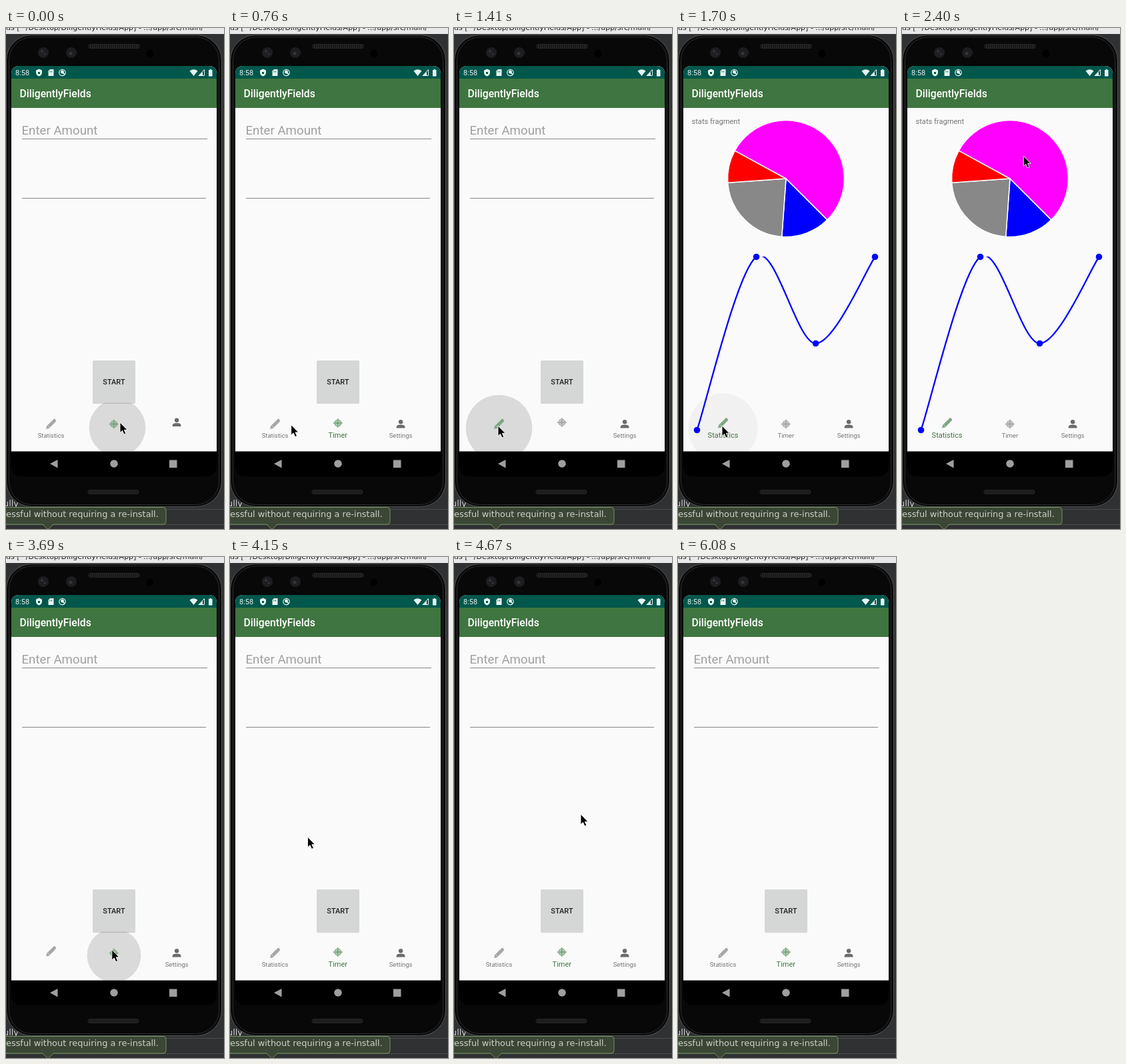
These frames come from a looping animation (327x752 px, 6670 ms). An HTML page:

```html
<!DOCTYPE html>
<html lang="en">
<head>
<meta charset="utf-8">
<title>Timer app</title>
<style>
  html, body { margin: 0; width: 100%; height: 100%; overflow: hidden; background: #2f3133; }
  svg { display: block; width: 327px; height: 752px; font-family: Roboto, sans-serif; }
  .desk { font-family: "DejaVu Sans", sans-serif; font-size: 12.9px; fill: #cfd1cc; }
  .medium { font-weight: 500; }
  .item text { text-anchor: middle; }
</style>
</head>
<body>
<svg viewBox="0 0 327 752">
  <defs>
    <clipPath id="screen"><path d="M8 636V69Q8 57 20 57H304Q316 57 316 69V635.500H8z"/></clipPath>
    <clipPath id="plot"><rect x="8" y="343" width="308" height="290"/></clipPath>
  </defs>

  <!-- desktop behind the phone -->
  <rect width="327" height="752" fill="#2f3133"/>
  <rect width="327" height="9" fill="#e8e8e8"/>
  <text class="desk" x="-3" y="3" style="font-size:11px;fill:#222">lds [~/Desktop/DiligentlyFields/App] - .../app/src/main/</text>
  <path d="M0 722.500H327M0 745.500H327" stroke="#4a4c4e"/>
  <text class="desk" x="-4" y="718">ully</text>
  <path d="M-2 719.500H236q4 0 4 4V741q0 4-4 4H71L63 753 55 745H-2z" fill="#3b4635" stroke="#75925c"/>
  <text class="desk" x="0" y="734">essful without requiring a re-install.</text>

  <!-- phone -->
  <rect x=".5" y="10.500" width="323" height="708" rx="38" fill="#0a0a0a" stroke="#555"/>
  <rect x="4.500" y="13.500" width="315" height="702" rx="35" fill="#080808" stroke="#2c2c2c"/>
  <g stroke="#242424" stroke-width="7" stroke-linecap="round">
    <path d="M127 27.500H197M126 696.500H196"/>
    <path d="M125 27.500H199M124 696.500H198" stroke="#111" stroke-width="5" stroke-linecap="butt" stroke-dasharray="1 2"/>
  </g>
  <g fill="#1d1d20">
    <circle cx="56" cy="37" r="8"/><circle cx="98" cy="37" r="8"/>
    <g fill="#34343a"><circle cx="54" cy="35" r="2"/><circle cx="58" cy="39" r="1.500"/><circle cx="97" cy="38" r="2.500"/></g>
  </g>
  <circle cx="215.500" cy="38" r="5.500" fill="#000"/>
  <path d="M8 635H316V657Q316 673 300 673H24Q8 673 8 657z" fill="#000"/>
  <g fill="#9f9f9f">
    <path d="M66 654L77.500 648V660.500z"/><circle cx="162" cy="654" r="5.800"/><rect x="245" y="648.500" width="11.500" height="11.500"/>
  </g>

  <g clip-path="url(#screen)">
    <rect x="8" y="57" width="308" height="579" fill="#fafafa"/>
    <rect x="8" y="57" width="308" height="20" fill="#00574b"/>
    <rect x="8" y="76" width="308" height="44" fill="#3f7540"/>
    <g fill="#e9f3f1">
      <text x="14" y="71" font-size="11">8:58</text>
      <path d="M49.500 61.500l4.500 2v3.500q0 3.500-4.500 5.500-4.500-2-4.500-5.500v-3.500z"/>
      <path d="M66 62H71.500V72H63.500V64.500z"/>
      <circle cx="84.500" cy="67" r="4.700" fill="none" stroke="#e9f3f1" stroke-width="1.200"/>
      <path d="M82 66a2.500 2.500 0 0 1 5 0v2.500h2.500L87 71l-1-2.500h-1.500A2.500 2.500 0 0 1 82 66z"/>
      <path d="M275.500 64.500Q281.500 60 287.500 64.500L281.500 72z"/>
      <path d="M289 71.500L297.500 62.500V71.500z" fill="none" stroke="#e9f3f1"/><path d="M289 72L295 66V72z"/>
      <path d="M304 63h1.500v-1h2.500v1h1.500v9.500h-5.500z"/>
      <path d="M48 66h3v3h-3zM65.500 64.500h1v2h-1zM68 64.500h1v2h-1z" fill="#00574b"/>
    </g>
    <text class="medium" x="20.500" y="104" font-size="15.700" fill="#fff">DiligentlyFields</text>

    <g id="stats">
      <text x="20.500" y="144" font-size="11.100" fill="#757575">stats fragment</text>
      <g id="pie" stroke="#fff" stroke-width="1.500"></g>
      <g id="chart" fill="#00f"></g>
    </g>

    <circle id="ripple"/>

    <g id="timer">
      <text x="23.500" y="160" font-size="18.700" fill="#a0a0a0">Enter Amount</text>
      <path d="M24 166.500H302M24 255.500H300" stroke="#868686"/>
      <rect x="130" y="499" width="64" height="65" rx="2" fill="#000" opacity=".15"/>
      <rect x="131" y="499" width="62" height="63.500" rx="1" fill="#d5d7d6"/>
      <text class="medium" x="162" y="535" font-size="11" text-anchor="middle" fill="#212121">START</text>
    </g>

    <g class="item">
      <g stroke-width="5">
        <path d="M-3.500 3.500L3-3"/><path d="M4-4L5-5" stroke-linecap="round"/>
        <path d="M-7.500 7.500L-6 1.500-1.500 6z" stroke="none"/>
      </g>
      <text>Statistics</text>
    </g>
    <g class="item">
      <g stroke-width="1.300">
        <circle r="4.800" fill-opacity=".5"/><circle r="2.300" stroke="none"/><path d="M0-7V7M-7 0H7"/>
      </g>
      <text>Timer</text>
    </g>
    <g class="item">
      <g stroke-width="0"><circle cy="-3.300" r="3.200"/><path d="M-6.400 6V4.400Q-6.400 1 0 1T6.400 4.400V6z"/></g>
      <text>Settings</text>
    </g>
  </g>

  <path id="cursor" d="M0 0V15.500L3.500 12.300 6 18 8.800 16.800 6.300 11.300H11z" stroke="#fff" stroke-width=".9" stroke-linejoin="round"/>
</svg>
<script>
const LOOP = 6670;
const $ = id => document.getElementById(id);
const clamp = v => Math.max(0, Math.min(1, v));
const mix = (a, b, p) => a + (b - a) * p;

// each stroke bends from the last resting point through `via` to `to`
const strokes = [
  { start: 60, end: 990, via: [118, 594], to: [66, 597] },
  { start: 1940, end: 2630, via: [170, 60], to: [223, 223] },
  { start: 2630, end: 3390, via: [180, 477], to: [159, 590] },
  { start: 3690, end: 4670, via: [60, 340], to: [190, 386] },
  { start: 5640, end: 6080, via: [247, 570], to: [303, 753] }
];
const REACT = 50; // delay between press and selection
const taps = [
  { at: -70, item: 1, previous: 2, x: 167, y: 600 },
  { at: 1279, item: 0, previous: 1, x: 67.5, y: 600.5 },
  { at: 3628, item: 1, previous: 0, x: 162, y: 598 }
];
const STATS_FROM = taps[1].at + 180, STATS_TO = taps[2].at + REACT;
const items = [...document.querySelectorAll('.item')].map((node, i) => ({
  icon: node.querySelector('g'),
  label: node.querySelector('text'),
  x: 67.5 + 94.3 * i,
  color: i === 2 ? '#6b6b6b' : '#a6a6a6'
}));

function set(node, attrs) {
  for (const name in attrs) node.setAttribute(name, attrs[name]);
}

function buildPie() {
  const rim = angle => `${162 + 87.5 * Math.cos(angle)} ${226 + 87.5 * Math.sin(angle)}`;
  let angle = Math.PI / 4;
  $('pie').innerHTML = [[3, '#00f'], [5, '#888'], [2, '#f00'], [12, '#f0f']].map(([share, color]) => {
    const start = rim(angle);
    angle += share / 22 * 2 * Math.PI;
    return `<path fill="${color}" d="M162 226L${start}A87.5 87.5 0 ${+(share > 11)} 1 ${rim(angle)}z"/>`;
  }).join('');
}

function buildChart() {
  const pts = [1, 3, 2, 3].map((value, i) => [28.5 + 89 * i, 733.5 - 130 * value]);
  const at = i => pts[Math.max(0, Math.min(3, i))];
  const handle = (i, sign) => at(i).map((v, k) => v + sign * .16 * (at(i + 1)[k] - at(i - 1)[k]));
  let d = 'M' + pts[0];
  for (let i = 0; i < 3; i++) d += `C${handle(i, 1)} ${handle(i + 1, -1)} ${pts[i + 1]}`;
  $('chart').innerHTML =
    `<path d="${d}" fill="none" stroke="#00f" stroke-width="2.3" clip-path="url(#plot)"/>` +
    pts.map(([x, y]) => `<circle cx="${x}" cy="${y}" r="4.8"/>`).join('');
}

function cursorAt(t) {
  let from = [171, 592];
  for (const { start, end, via, to } of strokes) {
    if (t < start) break;
    const p = clamp((t - start) / (end - start));
    from = from.map((v, k) => mix(mix(v, via[k], p), mix(via[k], to[k], p), p));
  }
  return from;
}

function drawRipple(t) {
  const tap = taps.filter(tap => tap.at <= t).pop();
  const age = t - tap.at;
  set($('ripple'), {
    cx: tap.x, cy: tap.y,
    r: 52 * (1 - Math.exp(-age / 42)),
    opacity: .13 * clamp(1 - (age - 150) / 370)
  });
}

function drawNav(t) {
  const tap = taps.filter(tap => tap.at + REACT <= t).pop();
  const p = clamp((t - tap.at - 135) / 150);
  items.forEach((item, i) => {
    const selected = i === tap.item, changing = selected || i === tap.previous;
    const y = selected ? mix(594.5, 593, p) : changing ? mix(592, 594.5, p) : 594.5;
    const color = selected ? '#7fa582' : item.color;
    set(item.icon, { transform: `translate(${item.x} ${y})`, fill: color, stroke: color });
    set(item.label, {
      x: item.x, y: 614.8,
      'font-size': selected ? 11 : 9.55,
      fill: selected ? '#3f7540' : '#757575',
      opacity: changing ? p : 1
    });
  });
}

function draw(t) {
  const showStats = t >= STATS_FROM && t < STATS_TO;
  set($('stats'), { visibility: showStats ? 'visible' : 'hidden' });
  set($('timer'), { visibility: showStats ? 'hidden' : 'visible' });
  set($('cursor'), { transform: `translate(${cursorAt(t).join(' ')})` });
  drawRipple(t);
  drawNav(t);
}

function tick() {
  draw(performance.now() % LOOP);
  requestAnimationFrame(tick);
}

buildPie();
buildChart();
tick();
</script>
</body>
</html>
```
